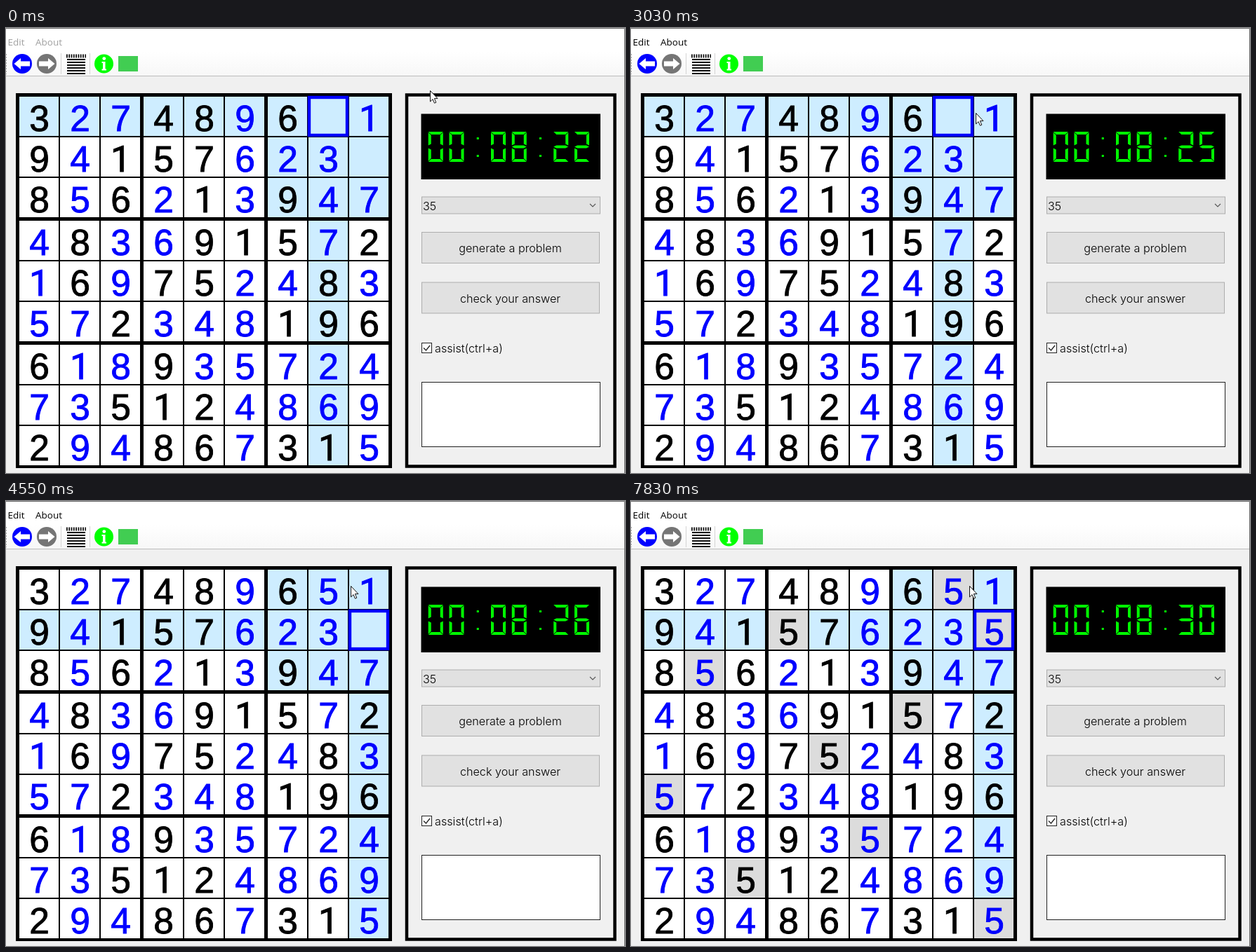
Write an HTML page that moves like this. It is 882 px wide and 635 px high and loops after 8 s.

```html
<!DOCTYPE html>
<html lang="en">
<head>
<meta charset="utf-8">
<title>Sudoku</title>
<style>
  html, body { margin: 0; width: 100%; height: 100%; overflow: hidden; background: #f0f0f0; }
  svg { display: block; width: 882px; height: 635px; }
  #menu { font: 13.5px "Open Sans", sans-serif; }
  #panel text { font: 300 16.2px Inter, sans-serif; fill: #000; }
  #digits text { font: 51.5px "Liberation Sans", sans-serif; text-anchor: middle; stroke-width: .9; }
  #digits .one { font-family: Roboto, sans-serif; }
  .given { fill: #000; stroke: #000; }
  .entry { fill: #00f; stroke: #00f; }
  .button { fill: #e1e1e1; stroke: #adadad; }
  .field { fill: #fff; stroke: #222; }
  .mid { text-anchor: middle; }
</style>
</head>
<body>
<svg viewBox="0 0 882 635">
  <defs>
    <linearGradient id="bar" x2="0" y2="1">
      <stop stop-color="#fff"/><stop offset="1" stop-color="#f7f7f7"/>
    </linearGradient>
  </defs>
  <rect width="882" height="635" fill="#f0f0f0"/>
  <rect width="882" height="34" fill="#fff"/>
  <rect y="34" width="882" height="34" fill="url(#bar)"/>
  <path d="M0 68.5H882" stroke="#bdbdbd"/>
  <path d="M0 .5H881.5V635" fill="none" stroke="#6a6a6a"/>
  <g id="menu"><text x="2.5" y="25">Edit</text><text x="42" y="25">About</text></g>

  <g id="toolbar">
    <path d="M.5 37V66" stroke="#aaa" stroke-dasharray="2 2"/>
    <path d="M78.5 36V66M119.5 36V66" stroke="#d4d4d4"/>
    <circle cx="23" cy="51" r="14" fill="#00f"/>
    <path id="arrow" d="M11.5 51L21 43V47.5H34V54.5H21V59Z" fill="#fff"/>
    <circle cx="58" cy="51" r="14" fill="#757575"/>
    <use href="#arrow" transform="matrix(-1 0 0 1 81 0)"/>
    <path d="M87 45H113M87 49H113M87 53H113M87 57H113M87 61H113M87 65H113"
      stroke="#111" stroke-width="1.8"/>
    <path d="M86 40H114" stroke="#111" stroke-width="5" stroke-dasharray="1.8 1.5"/>
    <circle cx="139.5" cy="51" r="13.5" fill="#0f0"/>
    <path d="M136.5 48H141.5V58.5H143V60.5H136.5V58.5H138V50H136.5Z" fill="#fff"/>
    <circle cx="139.8" cy="43.6" r="2.4" fill="#fff"/>
    <rect x="160" y="40" width="28" height="22" fill="#41cd52"/>
  </g>

  <g id="board">
    <rect x="14" y="93" width="536" height="535"/>
    <g id="cells"></g>
    <g id="digits"></g>
    <rect id="select" width="54" height="54" fill="none" stroke="#00f" stroke-width="4.4"/>
  </g>

  <g id="panel">
    <rect x="571" y="95.5" width="296.5" height="530" fill="none" stroke="#000" stroke-width="4.5"/>
    <rect x="591.5" y="122.5" width="255.5" height="93.5"/>
    <path id="clock" fill="#0f0"/>
    <rect class="button" x="592.5" y="241" width="254" height="24"/>
    <text x="594" y="259.5">35</text>
    <path d="M832 251L836 255L840 251" fill="none" stroke="#555" stroke-width="1.1"/>
    <rect class="button" x="592.5" y="291.5" width="253" height="44"/>
    <text class="mid" x="718.5" y="320">generate a problem</text>
    <rect class="button" x="592.5" y="363" width="253" height="44"/>
    <text class="mid" x="718.5" y="391.5">check your answer</text>
    <rect class="field" x="592.5" y="449.5" width="14" height="14"/>
    <path d="M595 456.5L598.5 460L604 453" fill="none" stroke="#222" stroke-width="1.3"/>
    <text x="611" y="462.5">assist(ctrl+a)</text>
    <rect class="field" x="592.5" y="505.5" width="254" height="92"/>
  </g>
  <path id="cursor" d="M.5 .5V16L4 12.6L6.5 18.2L8.8 17.2L6.4 11.6H11Z" fill="#fff" stroke="#111"/>
</svg>
<script>
const LOOP = 8000;
const $ = id => document.getElementById(id);
const rows = ["3274896.1", "94157623.", "856213947", "483691572", "169752483",
  "572348196", "618935724", "735124869", "294867315"];
const givens = ["100110100", "101110000", "101010100", "010011101", "010110010",
  "001000111", "100100000", "001110000", "100110110"];

// Each entry: time, then the state from that time on
const ticks = [940, 1990, 2940, 3870, 4860, 5850, 6890, 7830];
const selections = [[0, 0, 7], [4370, 1, 7], [4550, 1, 8]];
const entries = [[3690, 0, 7, "5"], [7370, 1, 8, "5"]];
const pointer = [[0, 604, 89], [2170, 597, 91], [2240, 571, 97], [2310, 535, 104],
  [2380, 503, 109], [2440, 481, 112], [2520, 468, 115], [2590, 464, 117],
  [2770, 470, 119], [2860, 480, 121], [2940, 488, 121], [3030, 491, 121], [6380, 482, 121]];
const FOCUS = 3030;

const latest = (list, t) => list.filter(e => e[0] <= t).pop().slice(1);
const block = i => Math.floor(i / 3);
const offset = i => 177 * block(i) + 58 * (i % 3);
const cellX = c => 19 + offset(c);
const cellY = r => 98 + offset(r);

function add(parent, tag, attrs) {
  const el = document.createElementNS("http://www.w3.org/2000/svg", tag);
  for (const k in attrs) el.setAttribute(k, attrs[k]);
  return $(parent).appendChild(el);
}

const cells = [];
for (let r = 0; r < 9; r++) for (let c = 0; c < 9; c++) {
  const x = cellX(c), y = cellY(r);
  const kind = givens[r][c] === "1" ? "given" : "entry";
  cells.push({
    r, c,
    box: add("cells", "rect", { x, y, width: 56, height: 56 }),
    text: add("digits", "text", {
      x: x + 28.5, y: y + 48.5,
      class: rows[r][c] === "1" ? kind + " one" : kind
    })
  });
}

// Seven-segment digit: L is the segment length, W its thickness
const L = 21, W = 4;
const bar = [[0, 0], [L, 0], [L - W, W], [W, W]];
const side = [[0, 1], [W, W + 1], [W, L - W / 2 - 1.5], [0, L - 1.5]];
const flipX = p => p.map(([x, y]) => [L - x, y]);
const flipY = p => p.map(([x, y]) => [x, 2 * L + 1 - y]);
const middle = [[0, L + .5], [W, L + .5 - W / 2], [L - W, L + .5 - W / 2],
  [L, L + .5], [L - W, L + .5 + W / 2], [W, L + .5 + W / 2]];
const segments = [bar, side, flipX(side), middle, flipY(side), flipY(flipX(side)), flipY(bar)];
const lit = ["012456", "25", "02346", "02356", "1235", "01356", "013456", "025", "0123456", "012356"];

const polygon = (pts, x) => "M" + pts.map(p => `${p[0] + x} ${p[1] + 148}`).join("L") + "Z";
const dot = (x, y) => `M${x} ${y}h3v3h-3z`;

function clockPath(label) {
  return [...label].map((ch, i) => {
    const x = 601.75 + 29.75 * i;
    if (ch === ":") return dot(x + 9.5, 156) + dot(x + 9.5, 181);
    return [...lit[ch]].map(s => polygon(segments[s], x)).join("");
  }).join("");
}

function draw(t) {
  const [sr, sc] = latest(selections, t);
  const value = (r, c) => {
    const e = entries.find(e => e[1] === r && e[2] === c && e[0] <= t);
    return e ? e[3] : rows[r][c];
  };
  const chosen = value(sr, sc);
  for (const { r, c, box, text } of cells) {
    const v = value(r, c);
    const linked = r === sr || c === sc || (block(r) === block(sr) && block(c) === block(sc));
    box.setAttribute("fill", v !== "." && v === chosen ? "#dcdcdc" : linked ? "#ceedff" : "#fff");
    text.textContent = v === "." ? "" : v;
  }
  $("select").setAttribute("x", cellX(sc) + 1);
  $("select").setAttribute("y", cellY(sr) + 1);
  $("clock").setAttribute("d", clockPath("00:08:" + (22 + ticks.filter(k => k <= t).length)));
  $("menu").setAttribute("fill", t < FOCUS ? "#a0a0a0" : "#000");
  $("cursor").setAttribute("transform", `translate(${latest(pointer, t)})`);
}

const start = performance.now();
function frame() {
  draw((performance.now() - start) % LOOP);
  requestAnimationFrame(frame);
}
frame();
</script>
</body>
</html>
```
